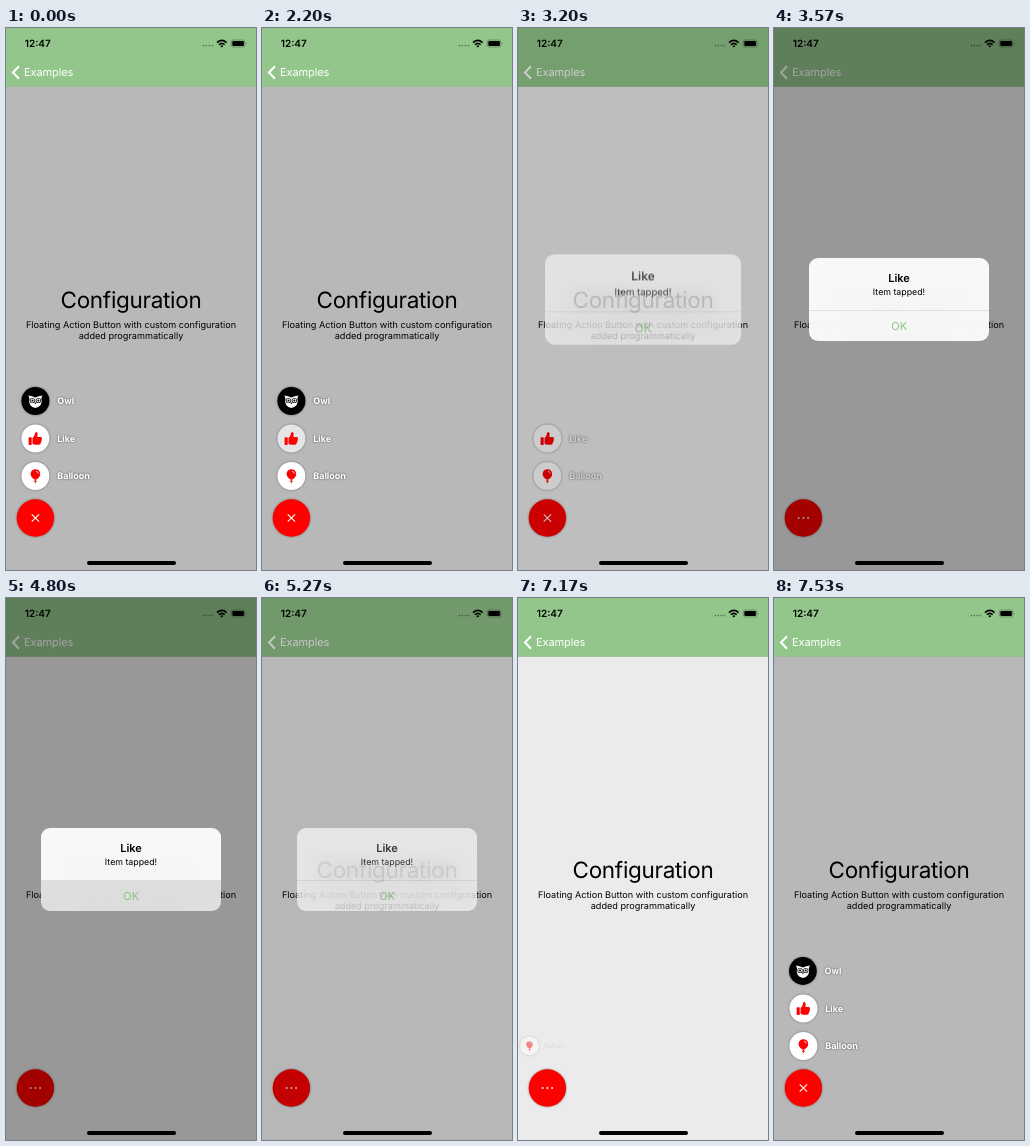
An HTML page for the animation above (7.73 s loop, 250 by 542 pixels).

```html
<!DOCTYPE html>
<html lang="en">
<head>
<meta charset="utf-8">
<title>Floating action button</title>
<style>
  html, body { margin: 0; width: 100%; height: 100%; overflow: hidden; background: #ededed; }
  #stage { position: relative; width: 250px; height: 542px; overflow: hidden; }
  #stage > * { position: absolute; left: 0; top: 0; }
  svg { display: block; font-family: Inter, Roboto, "Liberation Sans", sans-serif; text-rendering: geometricPrecision; }
  .mid { text-anchor: middle; }
  .semi { font-weight: 600; }
  .label { font-size: 9px; font-weight: 700; fill: #fff; filter: drop-shadow(0 .7px 1px rgba(0, 0, 0, .55)); }
  .disc { filter: drop-shadow(0 .7px 1.3px rgba(0, 0, 0, .4)); }
  #dim { width: 250px; height: 542px; background: #000; }
  #stage > #alert {
    left: 35px; top: 230px; width: 180px; height: 82.5px; border-radius: 9px; overflow: hidden;
    background: rgba(255, 255, 255, .93);
    -webkit-backdrop-filter: blur(9px); backdrop-filter: blur(9px);
  }
  #stage > #home { left: 81px; top: 533px; width: 89px; height: 4px; border-radius: 2px; background: #000; }
</style>
</head>
<body>
<div id="stage">
  <svg width="250" height="542" viewBox="0 0 250 542">
    <rect width="250" height="542" fill="#ededed"/>
    <text class="mid" x="125" y="279.5" font-size="22.5" letter-spacing="-.3">Configuration</text>
    <g class="mid" font-size="9.13">
      <text x="125" y="299.8">Floating Action Button with custom configuration</text>
      <text x="125" y="310.9">added programmatically</text>
    </g>
    <rect id="shade" y="58.7" width="250" height="483.3"/>

    <rect width="250" height="58.7" fill="#93c68b"/>
    <rect y="58.7" width="250" height=".25" opacity=".3"/>
    <path d="M13 38.3L7 44.5L13 50.7" fill="none" stroke="#fff" stroke-width="2"/>
    <text x="18" y="48.2" font-size="11" letter-spacing="-.1" fill="#fff">Examples</text>
    <text class="semi" x="18.7" y="19" font-size="10">12:47</text>
    <g opacity=".45">
      <circle cx="197.3" cy="17.6" r=".8"/><circle cx="200.3" cy="17.6" r=".8"/>
      <circle cx="203.3" cy="17.6" r=".8"/><circle cx="206.3" cy="17.6" r=".8"/>
    </g>
    <g fill="none" stroke="#000" stroke-width="1.6">
      <path d="M211 14.6Q215.8 10.3 220.6 14.6"/>
      <path d="M212.9 16.7Q215.8 14.1 218.7 16.7"/>
    </g>
    <path d="M214.2 17.9Q215.8 16.7 217.4 17.9L215.8 19.5Z"/>
    <rect x="225.3" y="12" width="13.6" height="7" rx="2" fill="none" stroke="#000" stroke-opacity=".4" stroke-width=".7"/>
    <rect x="226.3" y="13" width="11.6" height="5" rx="1.1"/>
    <path d="M239.8 14.3Q241 15.5 239.8 16.7Z" opacity=".5"/>

    <g class="item">
      <circle class="disc" r="14"/>
      <path fill="#fff" d="M-7-5.6Q-3.5-5.2 0-3.6Q3.5-5.2 7-5.6L5.9-2.6Q6.9 1 5.2 4Q3.4 6.4 0 7Q-3.4 6.4-5.2 4Q-6.9 1-5.9-2.6Z"/>
      <circle cx="-2.9" cy="-.5" r="2.6"/><circle cx="2.9" cy="-.5" r="2.6"/>
      <circle cx="-2.9" cy="-.5" r="1.9" fill="#fff"/><circle cx="2.9" cy="-.5" r="1.9" fill="#fff"/>
      <circle cx="-2.9" cy="-.5" r="1"/><circle cx="2.9" cy="-.5" r="1"/>
      <path d="M-1 1.6H1L0 3.6Z"/>
      <text class="label" x="21.8" y="3.4">Owl</text>
    </g>
    <g class="item">
      <circle id="like" class="disc" r="14" fill="#fff"/>
      <g fill="#f00">
        <rect x="-6.8" y="-1.2" width="3.1" height="7.6" rx=".6"/>
        <path d="M-2.9-.6Q-.6-2.4-.4-5Q-.2-6.8 1-6.6Q2.6-6 2.2-3.6L1.8-1.6H5.4Q6.9-1.4 6.4 .2Q7 1.2 6.1 2.1Q6.5 3.3 5.4 4Q5.7 6 3.6 6.2H0Q-1.6 6-2.9 5.2Z"/>
      </g>
      <text class="label" x="21.8" y="3.4">Like</text>
    </g>
    <g class="item">
      <circle class="disc" r="14" fill="#fff"/>
      <path fill="#f00" d="M0 4Q-4.8 1.6-4.8-2A4.8 4.8 0 0 1 4.8-2Q4.8 1.6 0 4ZM-1.7 5.8L0 3.4L1.7 5.8Z"/>
      <path d="M.6-4.9Q2.6-4.4 2.9-2.4" fill="none" stroke="#fff" stroke-width=".8"/>
      <path d="M0 5.5V7.4" stroke="#f00" stroke-width=".8"/>
      <text class="label" x="21.8" y="3.4">Balloon</text>
    </g>

    <g transform="translate(29.4 490)">
      <circle id="fab" class="disc" r="18.7"/>
      <g id="dots" fill="#fff">
        <circle cx="-4.7" r=".95"/><circle r=".95"/><circle cx="4.7" r=".95"/>
      </g>
      <path id="cross" d="M-3.7-3.7L3.7 3.7M-3.7 3.7L3.7-3.7" stroke="#fff" stroke-width="1.1"/>
    </g>
  </svg>
  <div id="dim"></div>
  <div id="alert">
    <svg width="180" height="82.5" viewBox="35 230 180 82.5">
      <rect id="row" x="35" y="283" width="180" height="30" opacity=".1"/>
      <rect x="35" y="282.4" width="180" height=".5" fill="#3c3c43" opacity=".25"/>
      <text class="mid semi" x="125" y="253.8" font-size="11">Like</text>
      <text class="mid" x="125" y="267.3" font-size="8.8">Item tapped!</text>
      <text class="mid" x="125.2" y="301.9" font-size="11" fill="#84c77c">OK</text>
    </svg>
  </div>
  <div id="home"></div>
</div>
<script>
const LOOP = 7730;
const $ = id => document.getElementById(id);
const items = [...document.querySelectorAll('.item')];
const rows = [373, 410.5, 448];
const openAt = 7141;

// Touches: [down, up]
const press = { like: [2200, 3100], ok: [4800, 5170], fab: [6470, 7160] };
const held = ([a, b], t) => t >= a && t < b;

const clamp = v => Math.min(1, Math.max(0, v));
const ease = (t, a, b) => {
  const x = clamp((t - a) / (b - a));
  return x * x * (3 - 2 * x);
};
// Critically damped, settled at the end time
const settle = (t, a, b) => {
  if (t <= a) return 0;
  if (t >= b) return 1;
  const x = (t - a) * .0142;
  return 1 - (1 + x) * Math.exp(-x);
};
// Underdamped spring that comes to rest after the duration
const spring = (t, start, duration, damping) => {
  if (t <= start) return 0;
  const decay = 6.9 * (t - start) / duration;
  const k = Math.sqrt(1 - damping * damping) / damping;
  return 1 - Math.exp(-decay) * (Math.cos(decay * k) + Math.sin(decay * k) / k);
};

function drawItem(el, i, t) {
  const closing = spring(t, 3105 + 100 * i, 150, .6);
  const opening = spring(t, openAt + 100 * (2 - i), 300, .55);
  const away = t < 5000 ? closing : 1 - opening;
  el.setAttribute('transform',
    `translate(${29.4 - 33.3 * away} ${rows[i]}) scale(${1 - .6 * away})`);
  el.style.opacity = clamp(1 - away);
}

function draw(t) {
  items.forEach((el, i) => drawItem(el, i, t));

  const opened = ease(t, openAt, openAt + 300);
  $('shade').style.opacity = .225 * (1 - ease(t, 3080, 3200) + opened);
  const cross = 1 - ease(t, 3150, 3450) + opened;
  $('cross').style.opacity = cross;
  $('dots').style.opacity = 1 - cross;

  const shown = settle(t, 3070, 3570);
  const hidden = settle(t, 5180, 5600);
  $('dim').style.opacity = .36 * (shown - hidden);
  const alert = $('alert');
  const visible = t < 5000 ? shown ** .85 : 1 - hidden ** 1.2;
  alert.style.display = visible > 0 ? 'block' : 'none';
  alert.style.opacity = visible;
  alert.style.transform = `scale(${1.2 - .2 * shown})`;

  $('like').style.fill = held(press.like, t) ? '#e5e5e5' : '#fff';
  $('fab').style.fill = held(press.fab, t) ? '#e50000' : '#f00';
  $('row').style.display = held(press.ok, t) ? '' : 'none';
}

const begin = performance.now();
function tick() {
  draw((performance.now() - begin) % LOOP);
  requestAnimationFrame(tick);
}
tick();
</script>
</body>
</html>
```
